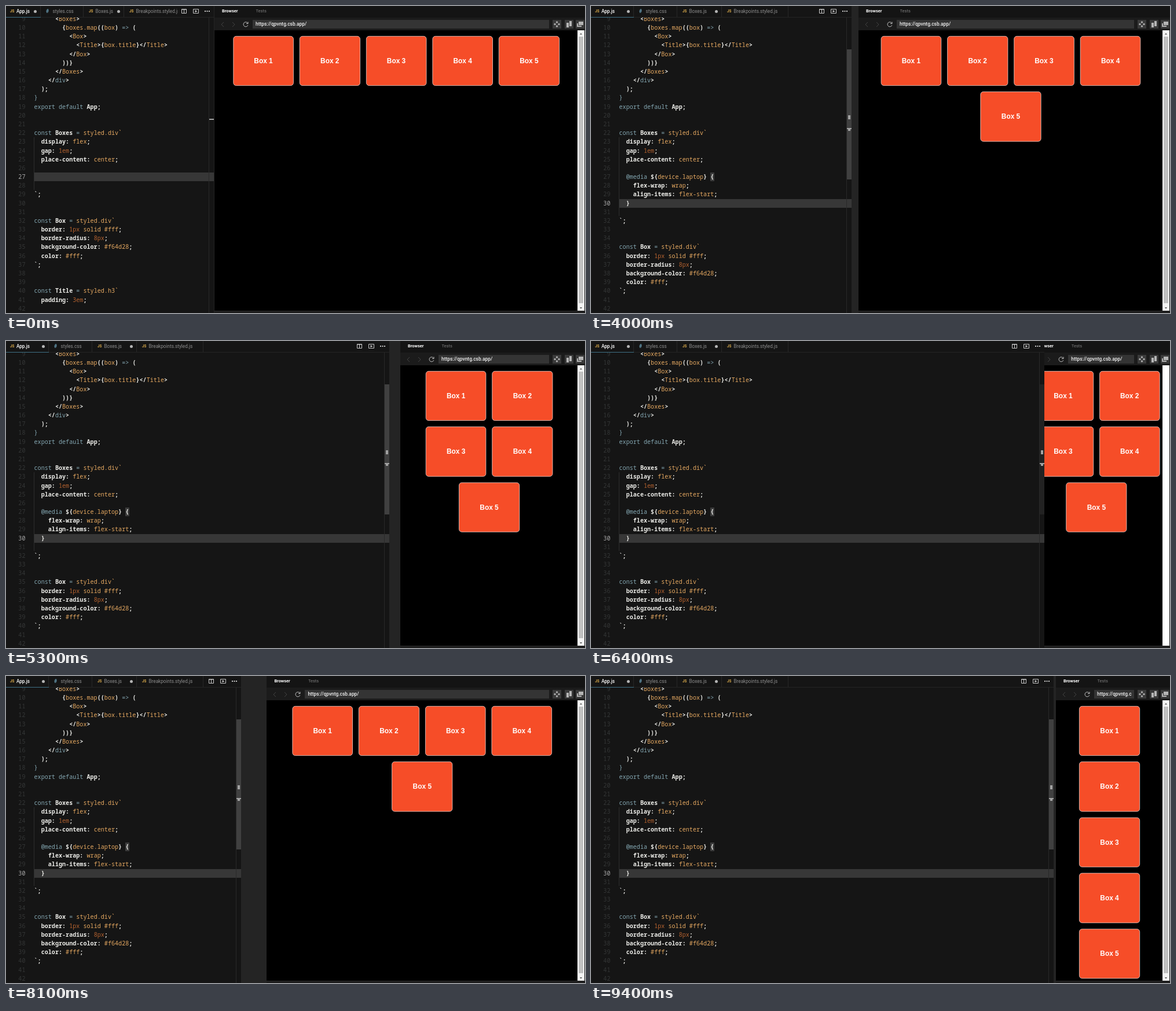
Write an HTML page that moves like this. It is 1000 px wide and 531 px high and loops after 9600 ms.

```html
<!DOCTYPE html>
<html lang="en">
<head>
<meta charset="utf-8">
<title>Flex wrap demo</title>
<style>
html, body { margin: 0; width: 100%; height: 100%; overflow: hidden; background: #242424; }
#stage { position: relative; width: 1000px; height: 531px; overflow: hidden; font: 8.2px Roboto, Arial, sans-serif; }
#stage div, #stage svg, .at { position: absolute; white-space: pre; }
svg { left: 0; top: 0; overflow: visible; }

#editor { left: 0; top: 0; height: 531px; background: #151515; overflow: hidden; z-index: 2; }
#code { top: 20px; left: 0; width: 100%; height: 511px; overflow: hidden;
  font: 500 10.12px/15.18px "Noto Sans Mono", "DejaVu Sans Mono", monospace; }
.line { left: 48.5px; height: 15.18px; }
.num { left: 0; width: 33.5px; text-align: right; color: #343636; font-weight: 400; }
.num.on { color: #a8a8a8; }
#active { left: 48px; right: 0; height: 15px; background: #373737; }
#guide { left: 48px; width: 1px; top: 207px; background: #2c2d2d; }
#match { left: 205.7px; top: 268px; width: 7px; height: 15px; background: #3c3c3c; }
#caret { left: 66px; top: 314px; width: 1px; height: 15px; background: #fff; }
.w { color: #eaeae6; font-weight: 600; } .b { color: #84a7b2; } .o { color: #e6a961; } .n { color: #b5622f; }

#ruler { right: 0; top: 20px; width: 9px; height: 511px; box-sizing: border-box; border-left: 1px solid #292929; }
#ruler div { background: #a2a2a2; }
#ruler #slider { left: 0; top: 55px; width: 9px; height: 225px; background: #404040; }
#tabs { left: 0; top: 0; height: 20px; overflow: hidden; }
.tab { top: 0; height: 19px; line-height: 18px; color: #8d8d8d; box-sizing: border-box; border-right: 1px solid #272727; overflow: hidden; }
.tab b { position: absolute; left: 9px; font-size: 6.3px; color: #d9a94a; }
.tab span { position: absolute; left: 20.5px; }
.tab i { position: absolute; right: 6px; top: 6.5px; width: 5px; height: 5px; border-radius: 50%; background: #b5b5b5; }
#tools { right: 0; top: 0; width: 62px; height: 19px; background: #151515; }
#rim { left: 0; top: 19px; width: 100%; height: 1px; background: #242424; }
#mark { left: 0; top: 19px; height: 1px; background: #3f7185; }

#browser { top: 0; right: 0; height: 531px; background: #141414; overflow: hidden; }
#bar { left: 0; right: 0; top: 20px; height: 22px; background: #1b1b1b; }
#url { left: 66px; right: 62px; top: 4px; height: 15px; line-height: 15px; background: #343434; overflow: hidden; }
#url span { position: absolute; left: 5px; right: 4px; overflow: hidden; color: #f2f2f2; font-weight: 500; font-size: 8.4px; }
.btn { top: 4px; width: 15px; height: 15px; background: #3a3a3a; }
#page { left: 0; right: 12px; top: 42px; height: 485px; background: #000; overflow: hidden; }
/* The previewed page is zoomed out */
#boxes { left: 0; top: 10.4px; width: calc(100% / .636); transform: scale(.636); transform-origin: 0 0;
  box-sizing: border-box; padding: 0 8px; display: flex; flex-wrap: wrap; gap: 16px; place-content: flex-start center; }
#stage .box { position: static; flex: none; box-sizing: border-box; width: 164.4px; height: 135.4px; border: 1px solid #fff;
  border-radius: 8px; background: #f64d28; color: #fff; text-align: center;
  font: bold 18.72px/133px "Liberation Sans", Arial, sans-serif; }
#scroll { right: 1px; top: 42px; width: 12px; height: 485px; background: #f4f4f4; }
#thumb { left: 2px; top: 11px; width: 8px; height: 461px; background: #c1c1c1; }
#foot { left: 0; right: 0; bottom: 0; height: 3px; background: #1c1c1c; border-top: 1px solid #2c2c2c; }
#pointer { z-index: 3; }
</style>
</head>
<body>
<div id="stage">
  <div id="browser">
    <span class="at" style="left:13px;top:4px;color:#fff;font-weight:700;font-size:7.4px">Browser</span>
    <span class="at" style="left:71.5px;top:4px;color:#7d7d7d;font-size:7.5px">Tests</span>
    <div id="bar">
      <svg width="66" height="22" fill="none" stroke="#424242">
        <path d="M16 8l-4 4 4 4M31 8l4 4-4 4"/>
        <path stroke="#c4c4c4" d="M57.4 9.6a4 4 0 1 0 .4 3.6M58 7.500v3h-3"/>
      </svg>
      <div id="url"><span>https://qpvntg.csb.app/</span></div>
      <div class="btn" style="right:41px"><svg width="15" height="15" fill="#b5b5b5"><path d="M7.500 2l2 2-2 2-2-2zM7.500 9l2 2-2 2-2-2zM4 5.500l2 2-2 2-2-2zM11 5.500l2 2-2 2-2-2z"/></svg></div>
      <div class="btn" style="right:20px"><svg width="15" height="15" fill="#b5b5b5"><path d="M3 5h4v8H3zM8 2h4v9H8z"/></svg></div>
      <div class="btn" style="right:1px"><svg width="15" height="15" fill="#b5b5b5"><path d="M5 3h8v6H5zM2 6h2v4h6v2H2z"/></svg></div>
    </div>
    <div id="page"><div id="boxes"></div></div>
    <div id="scroll">
      <div id="thumb"></div>
      <svg id="arrows" width="12" height="485" fill="#666"><path d="M4 7.500h4l-2-3zM4 479h4l-2 3z"/></svg>
    </div>
    <div id="foot"></div>
  </div>
  <div id="editor">
    <div id="code"></div>
    <div id="ruler">
      <div id="slider"></div>
      <div id="before" style="left:0;top:175px;width:8px;height:2px"></div>
      <div id="after" style="left:0;top:0;background:none">
        <div style="left:2px;top:169px;width:4px;height:7px"></div>
        <div style="left:0;top:191px;width:8px;height:2px"></div>
        <div style="left:2px;top:193px;width:4px;height:3px"></div>
      </div>
    </div>
    <div id="rim"></div>
    <div id="tabs"></div>
    <div id="mark"></div>
    <div id="tools">
      <svg width="62" height="19" fill="none" stroke="#c8c8c8">
        <path d="M6.500 5.500h8v7h-8zM10.500 5v8M6 6h9M26.500 5.500h9v7h-9z"/>
        <path fill="#c8c8c8" stroke="none" d="M29.500 7l4 2-4 2zM46 8h2v2h-2zM49.500 8h2v2h-2zM53 8h2v2h-2z"/>
      </svg>
    </div>
  </div>
  <svg id="pointer" width="9" height="13"><path d="M0 0v10.500l2.400-2.200 1.700 4 1.700-.7-1.700-3.900h3.200z" fill="#fff" stroke="#222" stroke-width=".5"/></svg>
</div>
<script>
const $ = id => document.getElementById(id);
const LOOP = 9600, PASTE = 200, ROW = 15.18;

// Each ~x starts a run of text in colour class x.
const head = [
  '~w      <~oBoxes~w>',
  '~w        {~oboxes.map~w((~obox~w) ~b=> ~w(',
  '~w          <~oBox~w>',
  '~w            <~oTitle~w>{~obox.title~w}</~oTitle~w>',
  '~w          </~oBox~w>',
  '~w        ))}',
  '~w      </~oBoxes~w>',
  '~w    </~bdiv~w>',
  '~w  );',
  '~b}',
  '~bexport default ~wApp;',
  '', '',
  '~bconst ~wBoxes ~b= ~ostyled.div`',
  '~w  display: ~oflex~w;',
  '~w  gap: ~n1em~w;',
  '~w  place-content: ~ocenter~w;',
  ''];
const media = [
  '~b  @media ~w${~odevice.laptop~w} {',
  '~w    flex-wrap: ~owrap~w;',
  '~w    align-items: ~oflex-start~w;',
  '~w  }'];
const tail = [
  '', '~w`;', '', '',
  '~bconst ~wBox ~b= ~ostyled.div`',
  '~w  border: ~n1px ~osolid #fff~w;',
  '~w  border-radius: ~n8px~w;',
  '~w  background-color: ~o#f64d28~w;',
  '~w  color: ~o#fff~w;',
  '~w`;', '', '',
  '~bconst ~wTitle ~b= ~ostyled.h3`',
  '~w  padding: ~n3em~w;', ''];

function add(parent, tag, cls, text = '') {
  const el = document.createElement(tag);
  el.className = cls;
  el.textContent = text;
  return parent.appendChild(el);
}

function showCode(pasted) {
  const code = $('code'), active = pasted ? 30 : 27;
  code.innerHTML = '<div id="active"></div><div id="guide"></div>' +
    (pasted ? '<div id="match"></div><div id="caret"></div>' : '');
  $('active').style.top = (active - 9) * ROW - 5 + 'px';
  $('guide').style.height = pasted ? '136px' : '91px';
  [...head, ...(pasted ? media : ['']), ...tail].slice(0, 34).forEach((src, i) => {
    const top = i * ROW - 5.2 + 'px';
    add(code, 'div', i + 9 === active ? 'num on' : 'num', i + 9).style.top = top;
    const line = add(code, 'div', 'line');
    line.style.top = top;
    src.split('~').slice(1).forEach(s => add(line, 'span', s[0], s.slice(1)));
  });
  $('before').hidden = pasted;
  $('after').hidden = !pasted;
}

const tabs = [['JS', 'App.js', 1], ['#', 'styles.css', 0], ['JS', 'Boxes.js', 1], ['JS', 'Breakpoints.styled.js', 0]]
  .map(([icon, name, dirty], i) => {
    const tab = add($('tabs'), 'div', 'tab');
    const mark = add(tab, 'b', '', icon), label = add(tab, 'span', '', name);
    if (dirty) add(tab, 'i', '');
    if (i === 0) {
      mark.style.left = '7px';
      label.style.cssText = 'left:18px;color:#fff;font-weight:500';
    }
    if (icon === '#') mark.style.cssText = 'color:#6ba0b8;font-size:8.5px';
    return tab;
  });
const narrow = [0, 60, 134, 204, 319], wide = [0, 74, 149, 226, 341];

for (let i = 1; i <= 5; i++) add($('boxes'), 'div', 'box', 'Box ' + i);

// Divider drag: time, x, speed in px per ms
const drag = [[2700, 360, 0], [4000, 462, .11], [5300, 681, .18], [6150, 800, 0], [7300, 435, -.06],
  [7800, 390, 0], [7900, 390, 0], [8600, 711, .08], [9400, 803, 0]];

function divider(t) {
  if (t <= drag[0][0]) return drag[0][1];
  const i = drag.findIndex(k => k[0] >= t);
  if (i < 0) return drag[drag.length - 1][1];
  const [t0, x0, v0] = drag[i - 1], [t1, x1, v1] = drag[i];
  const h = t1 - t0, u = (t - t0) / h, r = 1 - u;
  return r * r * ((1 + 2 * u) * x0 + u * h * v0) + u * u * ((3 - 2 * u) * x1 - r * h * v1);
}

let shown = null;
function draw(t) {
  const pasted = t >= PASTE;
  if (pasted !== shown) showCode(shown = pasted);

  // The editor resizes one step later than the browser pane.
  const left = divider(t), before = divider(t - 100), edge = before - 1;
  $('browser').style.width = 1000 - left + 'px';
  $('editor').style.width = edge + 'px';
  $('tabs').style.width = edge - 62 + 'px';

  const k = Math.min(1, Math.max(0, (edge - 359) / 43));
  const at = narrow.map((x, i) => x + (wide[i] - x) * k);
  tabs.forEach((tab, i) => {
    tab.style.left = at[i] + 'px';
    tab.style.width = at[i + 1] - at[i] + 'px';
  });
  $('mark').style.width = at[1] + 'px';

  // Dragging left blanks the page scrollbar and dims the editor's.
  const shrinking = left < before - 1;
  $('thumb').hidden = shrinking;
  $('arrows').style.display = shrinking ? 'none' : '';
  $('scroll').style.background = shrinking ? '#fff' : '#f4f4f4';
  $('slider').style.opacity = shrinking ? .3 : Math.min(1, Math.max(0, (t - 1300) / 300));

  if (pasted) $('caret').hidden = t >= 2700 || (t >= 400 && Math.floor((t - 400) / 500) % 2 === 1);

  const p = (t - 2400) / 200;
  const ptr = $('pointer').style;
  ptr.display = t >= 2200 && t < 2700 ? '' : 'none';
  ptr.left = 366 - p * (p < 0 ? 14 : 5) + 'px';
  ptr.top = 321 - p * 3 + 'px';
}

const start = performance.now();
function tick() {
  draw(Math.floor((performance.now() - start) % LOOP / 100) * 100);
  requestAnimationFrame(tick);
}
tick();
</script>
</body>
</html>
```
